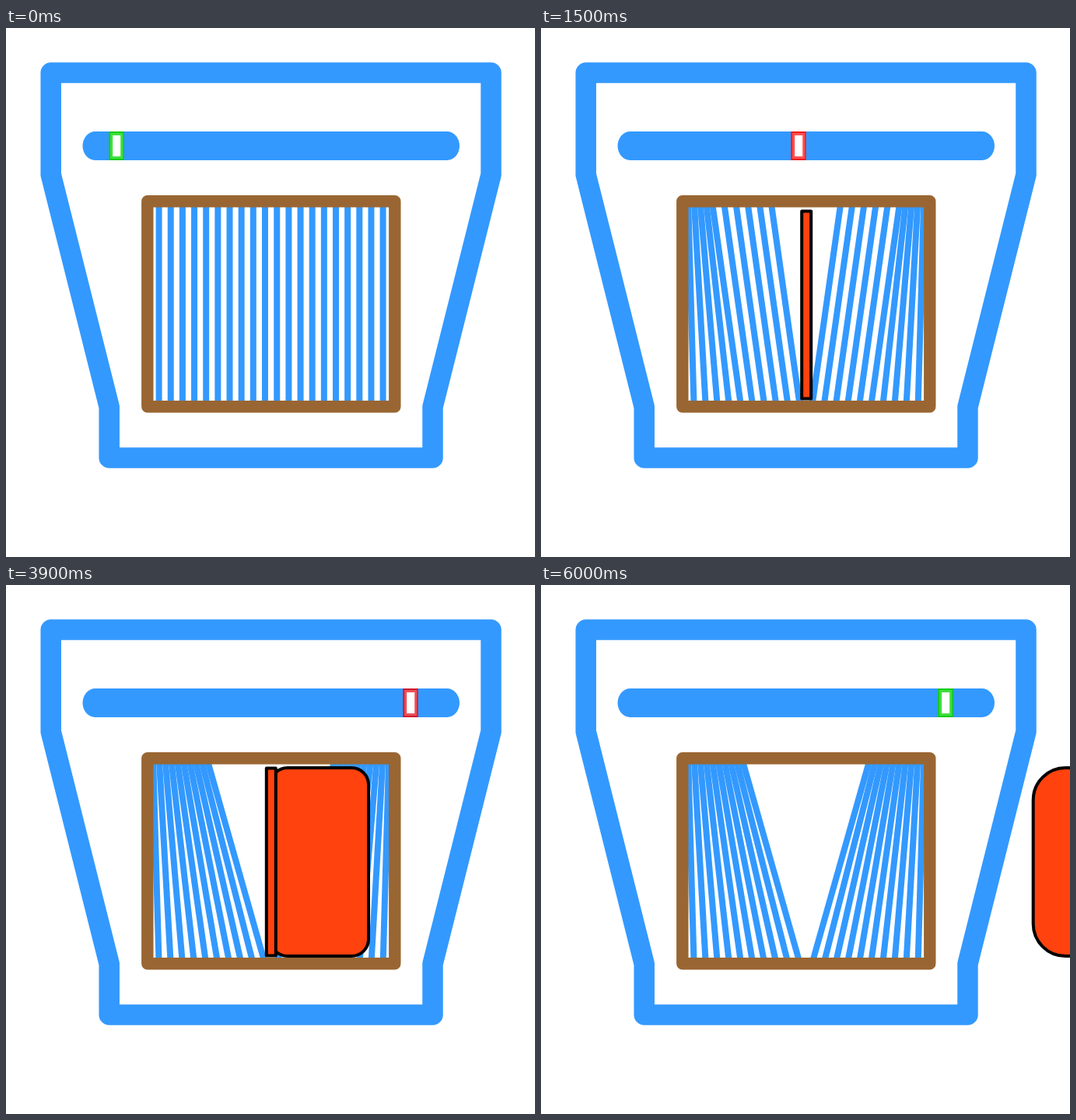
Recreate the animation shown at these times as an HTML page. Size 680 by 680 pixels, loop 6300 ms.

```html
<!DOCTYPE html>
<html lang="en">
<head>
<meta charset="utf-8">
<title>Slider and shutter</title>
<style>
  html, body { margin: 0; width: 100%; height: 100%; overflow: hidden; background: #fff; }
  svg { display: block; width: 100vw; height: 100vh; }
  .disc { fill: #ff420e; stroke: #000; stroke-width: 4; stroke-linejoin: round; }
</style>
</head>
<body>
<svg viewBox="0 0 680 680">
  <path d="M57.7 57.5H623.5V188.5L548.5 487V552.5H132.7V487L57.7 188.5Z"
        fill="none" stroke="#39f" stroke-width="26.5" stroke-linejoin="round"/>
  <rect x="98.5" y="133" width="484.5" height="37" rx="16" ry="18.5" fill="#39f"/>
  <g id="slider">
    <rect id="rim" x="0" y="133" width="19.5" height="37"/>
    <rect id="edge" x="2" y="135" width="16" height="33"/>
    <rect x="5" y="138" width="10" height="27" fill="#fff"/>
  </g>
  <g id="slats" stroke="#39f" stroke-width="8"></g>
  <rect x="181.8" y="222.7" width="318" height="264" fill="none"
        stroke="#963" stroke-width="15.4" stroke-linejoin="round"/>
  <rect id="panel" class="disc" y="235" height="242"/>
  <rect id="rod" class="disc" x="335.2" y="235.5" width="12" height="241"/>
</svg>
<script>
const STEP = 300, STEPS = 21;
const OPEN = 10, UNFOLD = 11, EJECT = 16;
const HALF = 10, TOP = 222, BOTTOM = 487, MIRROR = 681.2;
const RIGHT_EDGES = [359.2, 413, 466, 522, 579];
const COLORS = {
  green: ['#12cc18', '#3fe03f'],
  red: ['#f01c1c', '#ff5050'],
  dark: ['#d0182c', '#ea505a']
};

const get = id => document.getElementById(id);
const set = (el, attrs) => {
  for (const name in attrs) el.setAttribute(name, attrs[name]);
};

const slats = Array.from({ length: HALF * 2 }, () =>
  get('slats').appendChild(document.createElementNS('http://www.w3.org/2000/svg', 'line')));

function drawSlats(step) {
  for (let i = 0; i < HALF; i++) {
    const foot = 196.6 + 15.15 * i;
    // Outer slats stop first, the innermost travels furthest.
    const head = foot - 7.5 * Math.min(step, i + 1);
    set(slats[i], { x1: head, y1: TOP, x2: foot, y2: BOTTOM });
    set(slats[HALF + i], { x1: MIRROR - head, y1: TOP, x2: MIRROR - foot, y2: BOTTOM });
  }
}

function drawSlider(step) {
  const mood = step === 0 || step >= EJECT ? 'green' : step >= UNFOLD ? 'dark' : 'red';
  const [rim, edge] = COLORS[mood];
  const x = 132.2 + 37.8 * Math.min(step, OPEN);
  set(get('slider'), { transform: `translate(${x} 0)` });
  set(get('rim'), { fill: rim });
  set(get('edge'), { fill: edge });
}

function drawDisc(step) {
  const out = step >= EJECT;
  const left = out ? 400.7 + 58 * (step - EJECT) : 340;
  const width = out ? 239.4 : (RIGHT_EDGES[step - UNFOLD] || left) - left;
  const show = on => on ? 'visible' : 'hidden';
  set(get('panel'), { x: left, width, rx: width * 0.173, visibility: show(step >= UNFOLD) });
  set(get('rod'), { x: step >= UNFOLD ? 334.8 : 335.2, visibility: show(step > 0 && !out) });
}

let shown = -1;
const start = performance.now();

function tick() {
  const step = Math.floor((performance.now() - start) / STEP) % STEPS;
  if (step !== shown) {
    shown = step;
    drawSlats(step);
    drawSlider(step);
    drawDisc(step);
  }
  requestAnimationFrame(tick);
}
tick();
</script>
</body>
</html>
```
